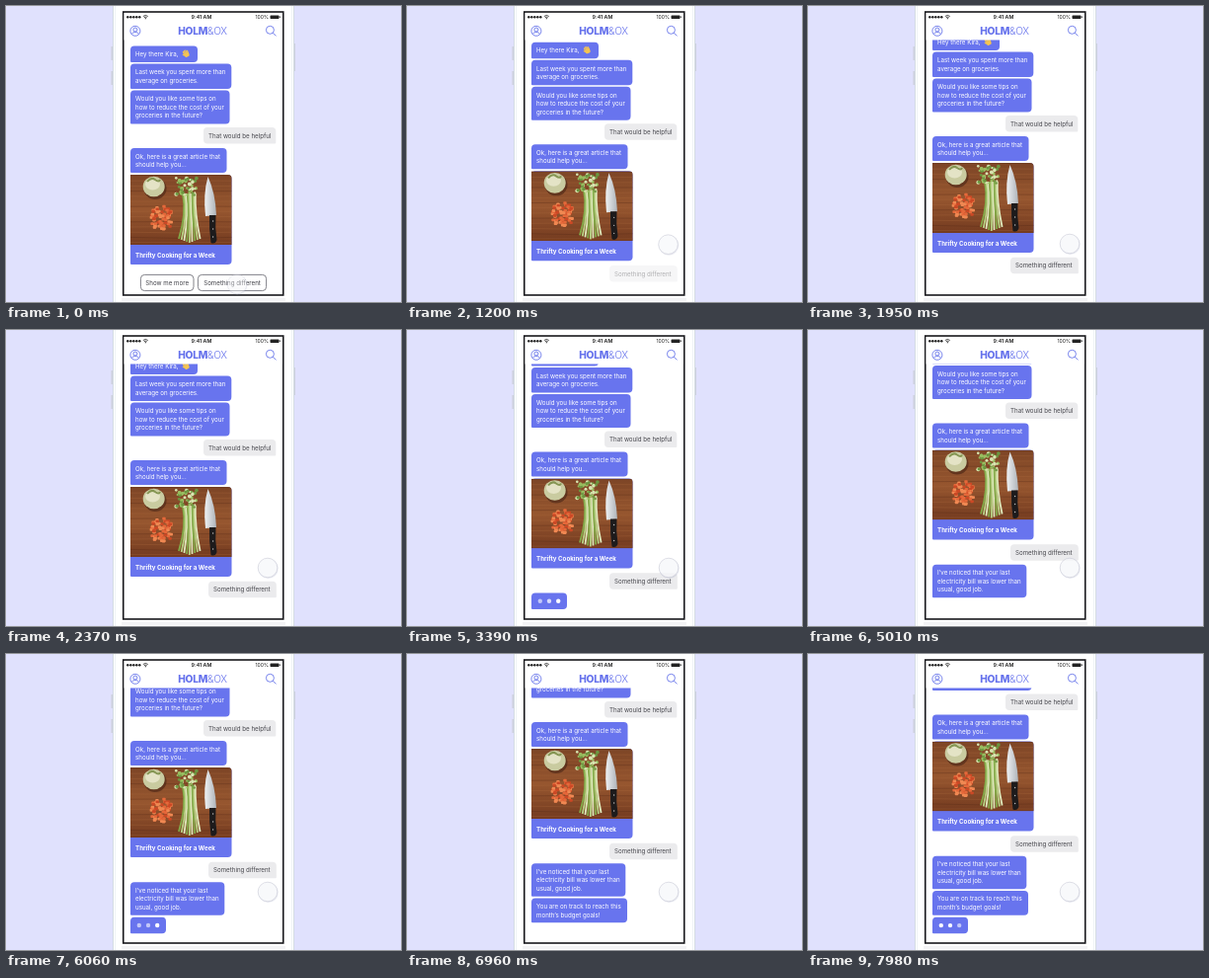
An HTML page for the animation above (8 s loop, 400x300 px).

```html
<!DOCTYPE html>
<html lang="en">
<head>
<meta charset="utf-8">
<title>Chat</title>
<style>
  html, body { margin: 0; width: 100%; height: 100%; overflow: hidden; background: #e0e1fd; }
  svg { display: block; width: 100vw; height: 100vh; }
  text { font-family: Inter, Roboto, sans-serif; font-size: 6.2px; white-space: pre; }
</style>
</head>
<body>
<svg id="stage" viewBox="0 0 400 300">
  <defs>
    <clipPath id="view"><rect x="119" y="34" width="161" height="258"/></clipPath>
    <clipPath id="photo"><path d="M126 242V171H225a3.5 3.5 0 0 1 3.5 3.5V242Z"/></clipPath>
    <linearGradient id="wood" x2="0" y2="1">
      <stop offset="0" stop-color="#7d4526"/><stop offset=".5" stop-color="#96562f"/><stop offset="1" stop-color="#743b20"/>
    </linearGradient>
    <linearGradient id="steel"><stop offset="0" stop-color="#eef0f2"/><stop offset="1" stop-color="#aeb4ba"/></linearGradient>
  </defs>

  <rect width="400" height="300" fill="#e0e1fd"/>
  <path d="M107.2 41v14M107.2 66v14M292.2 38v28" stroke="#cdd0dc" stroke-width="1.4"/>
  <rect x="108.5" y="-5" width="183" height="310" fill="#fff" stroke="#d3dbe2"/>
  <path d="M110.5 0V300M289.500 0V300" stroke="#eef3f5"/>
  <path d="M117 297.500H283" stroke="#f3f3f5" stroke-width="3"/>
  <rect x="118.750" y="6" width="162" height="287" fill="#fff" stroke="#17171b" stroke-width="1.6"/>

  <g clip-path="url(#view)">
    <g id="feed"></g>
    <g id="chips" fill="#fff" stroke="#63636b" stroke-width=".8">
      <rect x="136.400" y="272.400" width="53.600" height="16.200" rx="4"/>
      <rect x="194.400" y="272.400" width="69.200" height="16.200" rx="4"/>
      <g fill="#3f3f46" stroke="none" text-anchor="middle">
        <text x="163.200" y="282.600">Show me more</text><text x="229" y="282.600">Something different</text>
      </g>
    </g>
  </g>

  <rect x="119.600" y="7" width="160.300" height="27.500" fill="#fff" opacity=".94"/>
  <g id="signal" fill="#222"></g>
  <path d="M138.800 10.500q2.500-2.200 5 0M139.900 11.700q1.400-1.200 2.800 0" fill="none" stroke="#222" stroke-width=".8"/>
  <circle cx="141.300" cy="12.700" r=".6" fill="#222"/>
  <text x="198" y="13" text-anchor="middle" style="font-size:5.3px;font-weight:600" fill="#222">9:41 AM</text>
  <text x="266" y="13" text-anchor="end" style="font-size:5.1px" fill="#222">100%</text>
  <rect x="267.500" y="9.400" width="9" height="3.600" rx=".7" fill="#222"/>
  <path d="M277.300 10.400v1.600" stroke="#222" stroke-width=".8"/>
  <g fill="none" stroke="#6875ea" stroke-width=".9">
    <circle cx="130.900" cy="25.300" r="5"/><circle cx="130.900" cy="24" r="2"/>
    <path d="M127.200 28.700q.5-2.200 3.700-2.200t3.700 2.200"/>
    <circle cx="267.400" cy="24.300" r="4"/><path d="M270.300 27.200l3.200 3.200"/>
  </g>
  <text x="199" y="28.900" text-anchor="middle" style="font-size:10.2px;letter-spacing:-.25px" fill="#6672ec"><tspan font-weight="800">HOLM</tspan><tspan font-weight="300">&amp;OX</tspan></text>

  <g id="touch">
    <circle cx=".5" cy=".8" r="10.200" fill="#8f93b5" opacity=".22"/>
    <circle r="9.800" fill="#fff" fill-opacity=".72" stroke="#c3c4d2" stroke-width=".6"/>
  </g>
</svg>
<script>
const LOOP = 8000, BLUE = '#6874ee', GREY = '#ebebed';
const $ = id => document.getElementById(id);
const feed = $('feed');

function add(parent, tag, attrs, text) {
  const el = document.createElementNS('http://www.w3.org/2000/svg', tag);
  for (const k in attrs) el.setAttribute(k, attrs[k]);
  if (text) el.textContent = text;
  parent.appendChild(el);
  return el;
}

const clamp = v => Math.max(0, Math.min(1, v));
const easeOut = v => 1 - (1 - clamp(v)) ** 3;
const easeInOut = v => { v = clamp(v); return v * v * (3 - 2 * v); };

function seeded(seed) {
  return () => (seed = seed * 16807 % 2147483647) / 2147483647;
}

// Rounded box with one tight corner on the speaker's side.
function box(x, y, w, h, mine) {
  const r = 4, br = mine ? 1 : r, bl = mine ? r : 1;
  return `M${x + r} ${y}h${w - 2 * r}a${r} ${r} 0 0 1 ${r} ${r}v${h - r - br}a${br} ${br} 0 0 1 ${-br} ${br}` +
    `h${br + bl - w}a${bl} ${bl} 0 0 1 ${-bl} ${-bl}v${r + bl - h}a${r} ${r} 0 0 1 ${r} ${-r}z`;
}

function bubble(x, y, w, h, lines, mine) {
  const g = add(feed, 'g', {});
  add(g, 'path', { d: box(x, y, w, h, mine), fill: mine ? GREY : BLUE });
  const first = y + h / 2 + 2.3 - (lines.length - 1) * 4.3;
  lines.forEach((s, i) => add(g, 'text', { x: x + 5, y: first + i * 8.6, fill: mine ? '#46464c' : '#fff' }, s));
  return g;
}

function typing(y) {
  const g = add(feed, 'g', {});
  add(g, 'path', { d: box(126, y, 36, 16.5), fill: BLUE });
  g.dots = [134.8, 144, 153.2].map(cx => add(g, 'circle', { cx, cy: y + 8.3, r: 2.2, fill: '#fff' }));
  return g;
}

function drawPhoto() {
  const g = add(feed, 'g', { 'clip-path': 'url(#photo)' });
  const rnd = seeded(71);
  add(g, 'rect', { x: 126, y: 171, width: 103, height: 71, fill: 'url(#wood)' });
  for (let i = 0; i < 14; i++) {
    const y = 172 + i * 5.2;
    add(g, 'path', { d: `M126 ${y}q50 ${rnd() * 4 - 2} 103 0`, fill: 'none', stroke: i % 3 ? '#a5653b' : '#552a17', 'stroke-width': .6, opacity: .55 });
  }
  // turnip
  add(g, 'ellipse', { cx: 151, cy: 185, rx: 11.5, ry: 11, fill: '#472314', opacity: .6 });
  add(g, 'ellipse', { cx: 149.7, cy: 183, rx: 11, ry: 10.3, fill: '#c9cba0' });
  add(g, 'ellipse', { cx: 148.5, cy: 180.5, rx: 7.5, ry: 6, fill: '#e4e3c6' });
  add(g, 'path', { d: 'M143 178q4-5 8-2t5 0', fill: 'none', stroke: '#859653', 'stroke-width': 2 });
  // carrots
  for (let i = 0; i < 75; i++) {
    const a = rnd() * 6.283, r = Math.sqrt(rnd());
    add(g, 'rect', { x: 156.5 + Math.cos(a) * r * 12, y: 213.5 + Math.sin(a) * r * 12.5, width: 3.4, height: 2.8, rx: .8,
      fill: ['#e5683a', '#cc4825', '#f08852'][i % 3] });
  }
  // celery
  for (let i = 0; i < 9; i++) {
    const x = 179 + i * 1.6;
    add(g, 'path', { d: `M${x} 190Q${183 + i} 210 ${175 + i * 2.7} ${240 - Math.abs(i - 4)}`, fill: 'none',
      stroke: ['#83ad4a', '#b8d486', '#dfe9bc'][i % 3], 'stroke-width': 1.8 });
  }
  for (let i = 0; i < 48; i++) {
    add(g, 'circle', { cx: 172 + rnd() * 21, cy: 174 + rnd() * 18, r: 1 + rnd() * 1.1,
      fill: ['#d8e5b0', '#99bd60', '#6c9740'][i % 3] });
  }
  // knife
  add(g, 'path', { d: 'M204.500 173Q199.500 190 202 213L213 212Q212 189 204.500 173Z', fill: 'url(#steel)' });
  add(g, 'path', { d: 'M206 212H212.500Q211.500 225 213.500 237Q212 242 207.500 240Q205.500 226 206 212Z', fill: '#1d1b1c' });
  for (const y of [218, 226, 234]) add(g, 'circle', { cx: 209.6, cy: y, r: .7, fill: '#b9b9b9' });
}

for (let i = 0; i < 5; i++) add($('signal'), 'circle', { cx: 123.3 + i * 3, cy: 11.3, r: 1.2 });

bubble(126, 40.5, 68, 16.5, ['Hey there Kira,']);
const wave = add(feed, 'g', { transform: 'translate(182.500 48.500) rotate(-25)' });
add(wave, 'path', { d: 'M-2-3V0M-.600-3.700V0M.800-3.400V0M2.200-2.500V0M-3.300-.500L-1.500 1.500', stroke: '#f5c451', 'stroke-width': 1.2, 'stroke-linecap': 'round' });
add(wave, 'rect', { x: -2.5, y: -1, width: 5.2, height: 4.2, rx: 1.8, fill: '#f5c451' });
bubble(126, 58.5, 102.3, 25.5, ['Last week you spent more than', 'average on groceries.']);
bubble(126, 85.5, 100.5, 34, ['Would you like some tips on', 'how to reduce the cost of your', 'groceries in the future?']);
bubble(200, 123, 73.3, 16.5, ['That would be helpful'], true);
bubble(126, 144, 97.5, 25, ['Ok, here is a great article that', 'should help you...']);
add(feed, 'path', { d: box(126, 171, 102.5, 91), fill: BLUE });
drawPhoto();
add(feed, 'text', { x: 131, y: 254.7, fill: '#fff', 'font-weight': 700 }, 'Thrifty Cooking for a Week');

// Items that come and go: element, start, end.
const items = [
  [bubble(205, 266.7, 68.8, 16.5, ['Something different'], true), 1150, LOOP],
  [typing(287), 2950, 4530],
  [bubble(126, 287.3, 95.3, 33.5, ['I’ve noticed that your last', 'electricity bill was lower than', 'usual, good job.']), 4530, LOOP],
  [typing(322.7), 5500, 6550],
  [bubble(126, 322.5, 97, 24.8, ['You are on track to reach this', 'month’s budget goals!']), 6550, LOOP],
  [typing(349.3), 7550, LOOP]
];

// Scroll moves: start, distance, duration.
const moves = [[1150, 12, 450], [2950, 8.5, 350], [4530, 29, 400], [5500, 6.5, 350], [6550, 19, 400], [7550, 7.5, 350]];

function draw(t) {
  const scroll = moves.reduce((sum, [at, by, ms]) => sum + by * easeOut((t - at) / ms), 0);
  feed.setAttribute('transform', `translate(0 ${-scroll})`);

  const phase = (t - 3390) / 1270 + .5;
  for (const [el, from, to] of items) {
    el.setAttribute('opacity', t < to || to === LOOP ? clamp((t - from) / 120) : 0);
    (el.dots || []).forEach((dot, i) => {
      let d = phase - i * .25;
      d = Math.abs(d - Math.round(d));
      dot.setAttribute('opacity', .6 + .4 * clamp(1.6 - d * 5));
    });
  }

  $('chips').setAttribute('opacity', 1 - clamp((t - 400) / 200));
  const k = easeInOut((t - 600) / 650);
  $('touch').setAttribute('transform', `translate(${234 + 31 * k} ${282 - 41 * k})`);
  $('touch').setAttribute('opacity', .55 + .35 * k);
}

function tick() {
  draw(performance.now() % LOOP);
  requestAnimationFrame(tick);
}
tick();
</script>
</body>
</html>
```
